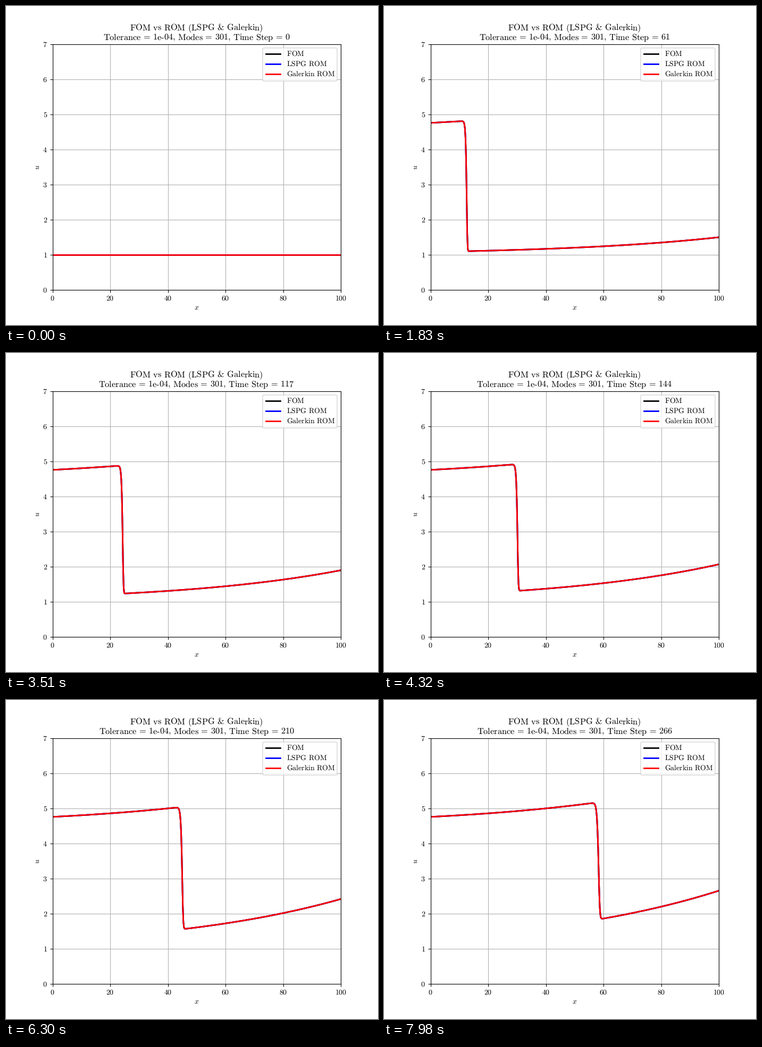
A matplotlib script for the animation above (8000 ms loop, 700x600 px).

```python
import numpy as np
import matplotlib.pyplot as plt
from matplotlib.animation import FuncAnimation
from matplotlib.lines import Line2D
from matplotlib.patches import FancyBboxPatch

plt.rcParams.update({"mathtext.fontset": "cm", "text.hinting": "none"})

W, HT = 700, 600
LOOP, INTERVAL, HOLD = 8000, 20, 30
STEPS = 267

# Burgers equation u_t + u u_x = 0.02 exp(RATE x), implicit Euler, linear elements
N = 511
H, DT = 100 / N, 0.07
INFLOW, RATE = 4.76, 0.0182
x = np.linspace(0, 100, N + 1)
load = 0.02 * np.exp(RATE * x) * H
load[-1] /= 2


def solve_tridiagonal(low, diag, up, rhs):
    low, diag, up, rhs = (v.tolist() for v in (low, diag, up, rhs))
    for i in range(1, len(diag)):
        m = low[i] / diag[i - 1]
        diag[i] -= m * up[i - 1]
        rhs[i] -= m * rhs[i - 1]
    rhs[-1] /= diag[-1]
    for i in range(len(diag) - 2, -1, -1):
        rhs[i] = (rhs[i] - up[i] * rhs[i + 1]) / diag[i]
    return np.array(rhs)


def advance(old):
    u = old.copy()
    u[0] = INFLOW
    res, diag = np.empty(N), np.empty(N)
    for _ in range(12):
        v = u - old
        a, b, c = u[:-2], u[1:-1], u[2:]
        p, q = u[-2:]
        res[:-1] = (H / 6 * (v[:-2] + 4 * v[1:-1] + v[2:])
                    + DT / 6 * (c * c + b * c - a * b - a * a))
        res[-1] = H / 6 * (v[-2] + 2 * v[-1]) + DT / 6 * (q - p) * (p + 2 * q)
        diag[:-1] = 4 * H / 6 + DT / 6 * (c - a)
        diag[-1] = 2 * H / 6 + DT / 6 * (4 * q - p)
        low = H / 6 - DT / 6 * (u[1:] + 2 * u[:-1])
        up = H / 6 + DT / 6 * (2 * c + b)
        du = solve_tridiagonal(low, diag, up, DT * load[1:] - res)
        u[1:] += du
        if np.abs(du).max() < 1e-6:
            break
    return u


states = [np.ones(N + 1)]
for _ in range(STEPS - 1):
    states.append(advance(states[-1]))

fig = plt.figure(figsize=(W / 100, HT / 100), dpi=100)
ax = fig.add_axes([0.125, 0.11, 0.775, 0.77])
ax.set(xlim=(0, 100), ylim=(0, 7))
ax.set_xticks(range(0, 101, 20))
ax.set_yticks(range(8))
ax.tick_params(labelbottom=False, labelleft=False)
ax.grid(True)


def roman(s):
    return rf"$\text{{{s}}}$"


def label(px, py, s, size=10, ha="center", **kw):
    """Text with its baseline at a pixel position counted from the top left."""
    return ax.text(px, HT - py, s, size=size, ha=ha, va="baseline",
                   transform=None, zorder=7, **kw)


def caption(step):
    return roman(f"Tolerance = 1e-04, Modes = 301, Time Step = {step}")


MID = 358.75
label(MID, 45.8, roman("FOM vs ROM (LSPG & Galerkin)"), 11.77)
title = label(MID, 63.6, caption(0), 11.77)
label(MID, 570.6, "$x$")
label(63, 303, "$u$", rotation=90, rotation_mode="anchor")
for k in range(6):
    label(87.5 + 108.5 * k, 553.4, roman(20 * k))
for k in range(8):
    label(77.8, 538.6 - 66 * k, roman(k), ha="right")

# Legend
ax.add_patch(FancyBboxPatch(
    (483, HT - 141.2), 140.1, 62.3, boxstyle="round,pad=0,rounding_size=2.78",
    fc="white", ec="0.8", lw=1, alpha=0.8, transform=None, zorder=5))
curves = []
series = [("FOM", "black"), ("LSPG ROM", "blue"), ("Galerkin ROM", "red")]
for k, (name, color) in enumerate(series):
    y = 89.5 + 19.3 * k
    ax.add_line(Line2D([488.6, 516.4], [HT - y] * 2, color=color, lw=2,
                       transform=None, zorder=6))
    label(527.5, y + 4.7, roman(name), ha="left")
    curves += ax.plot(x, states[0], color=color, lw=2)


def update(i):
    step = (i * INTERVAL + INTERVAL // 2) // HOLD
    for curve in curves:
        curve.set_ydata(states[step])
    title.set_text(caption(step))
    return [*curves, title]


anim = FuncAnimation(fig, update, frames=LOOP // INTERVAL, interval=INTERVAL,
                     init_func=lambda: update(0), repeat=True, repeat_delay=0)
plt.show()
```
